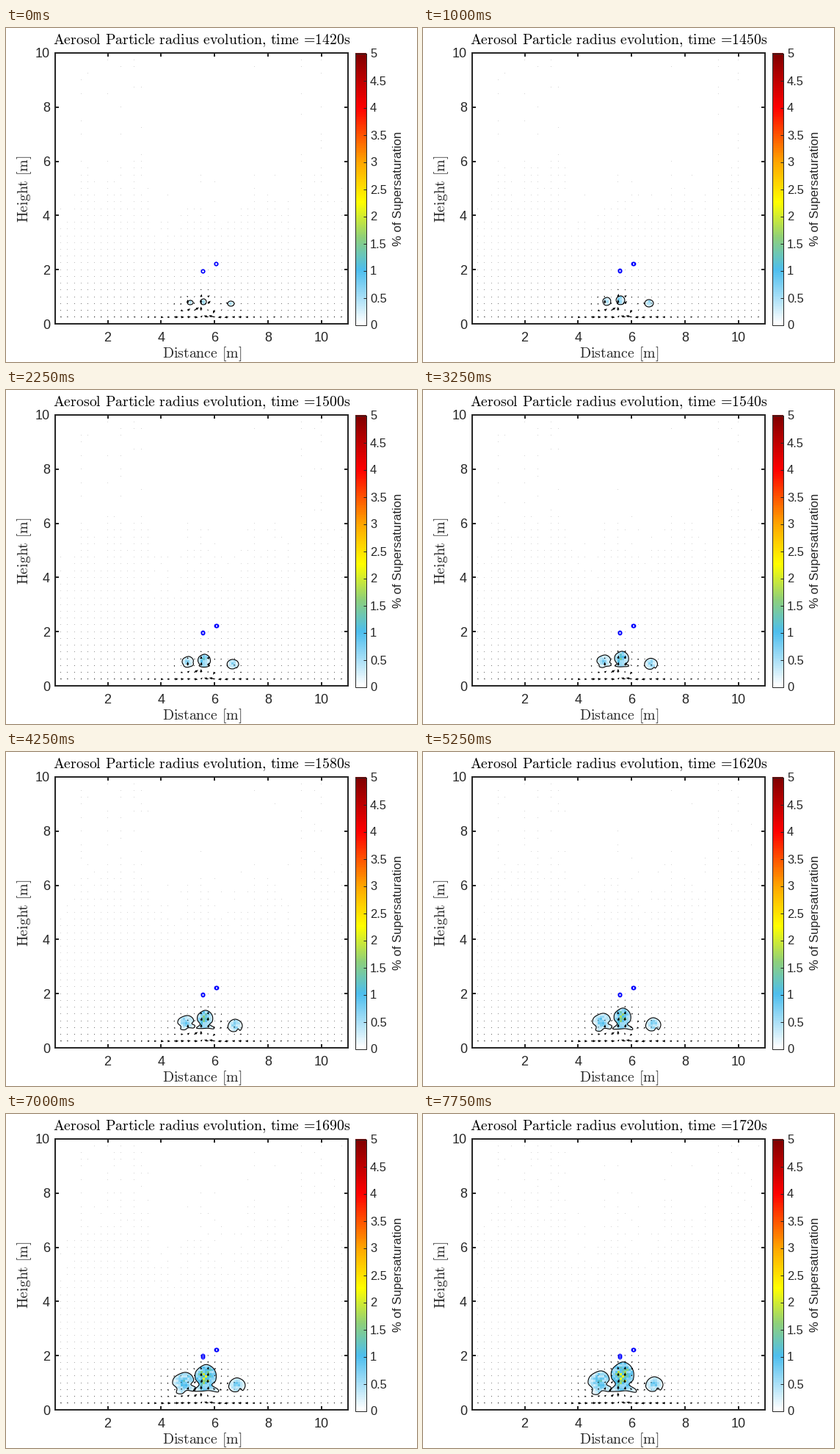
Recreate the animation shown at these times as a matplotlib script. Size 560 px wide and 455 px high, loop 8000 ms.

```python
import numpy as np
import matplotlib.pyplot as plt
from matplotlib.animation import FuncAnimation
from matplotlib.colors import LinearSegmentedColormap
from matplotlib.patches import PathPatch, Rectangle
from matplotlib.path import Path

W, H = 560, 455
PT = 0.72  # points per pixel at 100 dpi
LEFT, RIGHT, TOP, BOTTOM = 67, 466, 34, 403
INK = "#262626"
START, STEP, FRAMES, INTERVAL = 1420, 10, 32, 250

plt.rcParams["font.family"] = "Liberation Sans"
plt.rcParams["mathtext.fontset"] = "cm"

fig = plt.figure(figsize=(W / 100, H / 100), dpi=100, facecolor="white")
ax = fig.add_axes([0, 0, 1, 1])
ax.axis("off")

SUPERSAT = LinearSegmentedColormap.from_list("supersat", [
    (0.0, "#ffffff"), (0.2, "#4dbeee"), (0.32, "#8fd07a"), (0.45, "#ffff00"),
    (0.6, "#ffa500"), (0.8, "#ff0000"), (1.0, "#800000")])


# ---------- static plot furniture ----------

def px(x):
    return 65.7 + 36.4 * x


def py(y):
    return BOTTOM - 36.9 * y


def label(x, y, text, size, ha="center", color=INK, rotation=0):
    return ax.text(x, y, text, fontsize=size * PT, ha=ha, va="baseline",
                   color=color, rotation=rotation, rotation_mode="anchor")


def line(xs, ys, width):
    ax.plot(xs, ys, color=INK, lw=width * PT, solid_capstyle="butt", zorder=6)


def roman(text):
    """Typeset text in upright Computer Modern with ordinary word spaces."""
    text = text.replace(", ", r",\hspace{0.18}")
    text = text.replace(" =", r"\hspace{0.18}=\hspace{-0.2}")
    return r"$\mathrm{" + text.replace(" ", r"\hspace{0.38}") + "}$"


def draw_axes():
    ax.add_patch(Rectangle((LEFT, TOP), RIGHT - LEFT, BOTTOM - TOP, fill=False,
                           ec=INK, lw=2 * PT, zorder=6))
    for v in range(2, 11, 2):
        line([px(v)] * 2, [BOTTOM, BOTTOM - 5], 2)
        line([px(v)] * 2, [TOP, TOP + 5], 2)
        label(px(v), 427, str(v), 18)
    for v in range(0, 11, 2):
        line([LEFT, LEFT + 5], [py(v)] * 2, 2)
        line([RIGHT - 5, RIGHT], [py(v)] * 2, 2)
        label(60, py(v) + 6.5, str(v), 18, ha="right")
    label(267, 449, roman("Distance [m]"), 19.8)
    label(30.5, 219, roman("Height [m]"), 19.8, rotation=90)


def draw_colorbar():
    x0, x1, y0, y1 = 475.5, 490.5, 34.5, 404.5
    ax.imshow(np.linspace(5, 0, 256)[:, None], extent=(x0, x1, y1, y0),
              cmap=SUPERSAT, vmin=0, vmax=5, aspect="auto")
    ax.add_patch(Rectangle((x0, y0), x1 - x0, y1 - y0, fill=False, ec=INK, lw=PT))
    for v in np.arange(0, 5.1, 0.5):
        y = y1 - 74 * v
        line([x1 - 4, x1], [y, y], 1)
        label(496, y + 6, f"{v:g}", 16.5, ha="left")
    label(539, 219, "% of Supersaturation", 16.6, rotation=90)


draw_axes()
draw_colorbar()
title = label(267, 22, "", 19.8, color="black")


# ---------- rising plumes ----------

KEY_TIMES = [1420, 1450, 1500, 1580, 1620, 1660, 1720]


class Plume:
    """Cloud outline: an ellipse that turns into a mushroom in a growing box."""

    def __init__(self, boxes, shape, peak, spin):
        self.boxes = np.array(boxes).T
        self.shape = np.array(shape)
        self.peak, self.spin = peak, spin

    def box(self, t):
        return [np.interp(t, KEY_TIMES, side) for side in self.boxes]

    def outline(self, t):
        x0, x1, y0, y1 = self.box(t)
        d = self.shape - 0.5
        round_shape = 0.5 + 0.5 * d / np.hypot(*d.T)[:, None]
        mix = np.interp(t, [1420, 1500, 1580, 1620], [0, 0.25, 0.9, 1])
        unit = round_shape + mix * (self.shape - round_shape)
        return smooth([x0, y0] + unit * [x1 - x0, y1 - y0])

    def strength(self, t):
        return np.interp(t, [1420, 1720], self.peak)


def smooth(p):
    """Closed Catmull-Rom curve through the points."""
    a, c, d = np.roll(p, 1, 0), np.roll(p, -1, 0), np.roll(p, -2, 0)
    s = np.linspace(0, 1, 8, endpoint=False)[None, :, None]
    a, b, c, d = (q[:, None] for q in (a, p, c, d))
    curve = 0.5 * (2 * b + (c - a) * s + (2 * a - 5 * b + 4 * c - d) * s**2
                   + (3 * b - a - 3 * c + d) * s**3)
    return curve.reshape(-1, 2)


def closed_path(points):
    return Path(np.vstack([points, points[:1]]), closed=True)


PLUMES = [
    Plume([(247, 255, 371, 377), (245, 256, 367, 378), (240, 256, 363, 378),
           (234, 258, 359, 379), (231, 258, 356, 381), (229, 261, 354, 381),
           (225, 257, 350, 383)],
          [(.5, 0), (.78, .1), (.9, .35), (.78, .55), (.97, .68), (.9, .85),
           (.6, .82), (.4, .97), (.17, .93), (.18, .72), (0, .5), (.1, .2)],
          (0.6, 1.0), 1.2),
    Plume([(265, 273, 369, 377), (263, 275, 365, 377), (261, 279, 360, 378),
           (258, 284, 352, 378), (257, 286, 349, 379), (255, 289, 345, 379),
           (252, 291, 338, 380)],
          [(.48, 0), (.74, .08), (.89, .3), (.88, .57), (.74, .73), (.96, .88),
           (.96, .98), (.64, .93), (.33, .95), (.05, .93), (.26, .72),
           (.12, .5), (.16, .22)],
          (0.8, 1.8), 1.8),
    Plume([(302, 311, 372, 379), (302, 314, 370, 380), (301, 317, 367, 380),
           (302, 322, 364, 381), (303, 324, 362, 380), (303, 325, 361, 379),
           (303, 327, 358, 378)],
          [(.55, 0), (.88, .2), (1, .55), (.86, .9), (.7, .76), (.55, .97),
           (.25, .97), (.03, .7), (.08, .35), (.26, .1)],
          (0.6, 0.8), 0.9),
]

rng = np.random.default_rng(5)
CELL = 3
cell_x, cell_y = np.meshgrid(np.arange(221.5, 335, CELL), np.arange(333.5, 390, CELL))
grain = rng.uniform(0.45, 1.3, cell_x.shape)
haze = ax.imshow(grain, extent=(220, 220 + CELL * cell_x.shape[1],
                                332 + CELL * cell_x.shape[0], 332),
                 cmap=SUPERSAT, vmin=0, vmax=5, aspect="auto",
                 interpolation="nearest", zorder=2)
cloud = PathPatch(closed_path(PLUMES[0].outline(START)), fill=False, ec="black",
                  lw=1.1 * PT, zorder=3)
ax.add_patch(cloud)


def saturation(t):
    total = np.zeros(cell_x.shape)
    for p in PLUMES:
        x0, x1, y0, y1 = p.box(t)
        dx = (cell_x - (x0 + x1) / 2) / (0.36 * (x1 - x0))
        dy = (cell_y - (0.55 * y0 + 0.45 * y1)) / (0.48 * (y1 - y0))
        total += p.strength(t) * np.exp(-dx**2 - dy**2)
    return total * grain


# ---------- wind field ----------

col, row = np.meshgrid(np.arange(1, 44) / 4, np.arange(40) / 4)
X, Y = px(col).ravel(), py(row).ravel()
height = row.ravel()
shake = rng.normal(0, 1, (2, X.size))
gust = rng.uniform(0.75, 1.25, X.size)
rarity = (0.6 * rng.random(43)[None, :] + 0.4 * rng.random(row.shape)).ravel()

arrows = ax.quiver(X, Y, 0 * X, 0 * Y, angles="xy", scale_units="xy", scale=1,
                   units="dots", width=1.3, headwidth=2.6, headlength=3,
                   headaxislength=3, minlength=0.05, color="black", zorder=4)
dots = ax.scatter(np.floor(X) + 0.5, np.floor(Y) + 0.5, s=PT**2, marker="s",
                  linewidths=0, color="black", zorder=1)


def wind(t):
    u, v = np.zeros(X.size), np.zeros(X.size)
    for p in PLUMES:
        x0, x1, y0, y1 = p.box(t)
        size = max(x1 - x0, 18)
        cx, cy, r = (x0 + x1) / 2, y0 + 0.55 * (y1 - y0), 0.36 * size
        # vortex pair plus its mirror image below the ground
        for side in (-1, 1):
            for sign, yc in ((1, cy), (-1, 2 * BOTTOM - cy)):
                dx, dy = X - cx - side * r, Y - yc
                d2 = dx**2 + dy**2 + 1e-6
                k = side * sign * p.spin * size * (1 - np.exp(-d2 / r**2)) / d2
                u -= k * dy
                v += k * dx
    # updraft below the middle cloud and inflow along the ground
    v -= 5 * np.exp(-((X - 268) / 7)**2 - ((Y - 380) / 14)**2)
    ground = np.exp(-((Y - 393.8) / 6)**2)
    d = X - 268
    u -= np.tanh(d / 8) * (1.2 + 2.8 * np.exp(-(d / 75)**2)) * ground * gust
    rough = np.interp(t, [1420, 1720], [2.6, 1.2])
    rough = rough * np.exp(-((X - 272) / 38)**2 - ((Y - 382) / 14)**2)
    u += rough * shake[0]
    v += rough * shake[1]
    v[height == 0] = 0
    speed = np.hypot(u, v)
    limit = np.minimum(1, 10 / np.maximum(speed, 1e-6))
    return u * limit, v * limit, speed


def dot_alpha(t):
    reach = np.interp(t, [1420, 1720], [4.2, 6.5])
    floor = np.interp(t, [1420, 1720], [0.14, 0.28])
    shown = rarity < np.maximum(floor, 1.55 - height / reach)
    return shown * np.maximum(0.17, 0.8 * np.exp(-height / 2))


# ---------- aerosol particles ----------

def ring():
    return ax.plot([], [], "o", ms=4.4 * PT, mfc="none", mec="blue",
                   mew=1.4 * PT, zorder=5)[0]


rings = [ring() for _ in range(4)]


def place_rings(t):
    rise = np.interp(t, [1420, 1580, 1720], [0, 0.5, 2])
    slide = np.interp(t, [1420, 1450], [0, 1])
    spots = [(268.4, 330.5), (268.4, 330.5 - rise),
             (286.4, 320.5), (286.4 + slide, 320.5)]
    for mark, (x, y) in zip(rings, spots):
        mark.set_data([x], [y])


def update(frame):
    t = START + STEP * max(0, frame - 1)
    title.set_text(roman(f"Aerosol Particle radius evolution, time ={t}s"))

    cloud.set_path(Path.make_compound_path(
        *(closed_path(p.outline(t)) for p in PLUMES)))
    haze.set_data(saturation(t))
    haze.set_clip_path(cloud)

    u, v, speed = wind(t)
    strong = speed > 1
    arrows.set_UVC(u * strong, v * strong)
    rgba = np.zeros((X.size, 4))
    rgba[:, 3] = dot_alpha(t)
    dots.set_facecolor(rgba)
    place_rings(t)


ax.set_xlim(0, W)
ax.set_ylim(H, 0)
animation = FuncAnimation(fig, update, frames=FRAMES, interval=INTERVAL,
                          init_func=lambda: update(0), repeat=True,
                          repeat_delay=0, blit=False)
plt.show()
```
